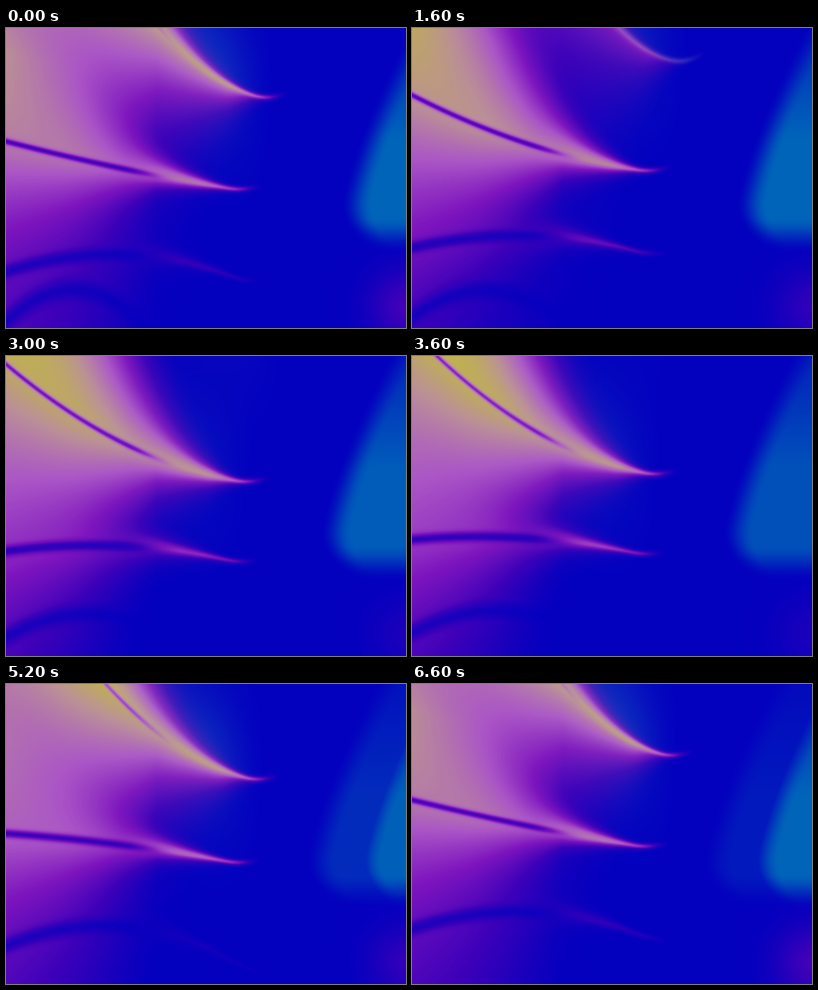
An HTML page with a canvas that plays this animation: 400 px wide and 300 px high, repeating every 6700 ms.

```html
<!DOCTYPE html>
<html lang="en">
<head>
<meta charset="utf-8">
<title>Gradient folds</title>
<style>
html, body { margin: 0; width: 100%; height: 100%; overflow: hidden; background: #0300be; }
canvas { display: block; width: 100vw; height: 100vh; }
</style>
</head>
<body>
<canvas width="400" height="300"></canvas>
<script>
const W = 400, H = 300, STEPS = 67;
const ctx = document.querySelector('canvas').getContext('2d');
const image = ctx.createImageData(W, H);

function smooth(a, b, x) {
  const f = Math.min(1, Math.max(0, (x - a) / (b - a)));
  return f * f * (3 - 2 * f);
}

const bell = x => Math.exp(-x * x);

// Blue, violet, purple, pink, tan, yellow
const stops = [[3, 0, 190], [60, 0, 185], [125, 20, 190], [170, 85, 198], [186, 142, 150], [192, 185, 60]];
const palette = Array.from({ length: 257 }, (_, i) => {
  const at = i / 256 * 5, k = Math.min(4, Math.floor(at));
  return stops[k].map((v, j) => v + (stops[k + 1][j] - v) * (at - k));
});

// A fold rises one place per loop; its crease is a parabola ending at the tip.
function makeFold(age) {
  const late = Math.max(0, age), early = Math.min(0, age), sweep = late ** 2.6;
  const y0 = 113 - 170 * age - 40 * early ** 2 - 233 * sweep;
  const y1 = 147 - 82 * age - 70 * sweep;
  const tipX = 240 + 12 * age + 15 * age ** 2;
  const tipY = 163 - 78 * age - 8 * age ** 3 - 6 * age ** 5;
  const slope = (y1 - y0) / 150;
  const bend = ((tipY - y1) / (tipX - 150) - slope) / tipX;

  const level = smooth(-1.5, .9, age) * (1 - smooth(1, 1.5, age));
  const rise = .4 + .6 * bell((age - .4) / .4);
  const fall = Math.max(.5, .6 + 1.2 * age + .9 * late ** 2);
  const cool = smooth(1, 1.35, age);
  const glow = Math.max(0, 1 - Math.abs(age - .9) / .7);
  const crease = .68 - .25 * smooth(.3, .8, age);

  function column(x) {
    const q = Math.max(.1, (tipX - x) / 100);
    return {
      y: y0 + slope * x + bend * x * (x - 150) - .006 * Math.max(0, x - tipX + 20) ** 2,
      up: 2 + 55 * rise * q ** 2.2,
      down: 2 + 24 * fall * q ** 1.6 + 50 * (1 + 1.5 * late) * Math.max(0, 1 - x / 150),
      body: level * smooth(tipX + 8, tipX - 50, x) * (1 - .25 * smooth(50, 220, x)),
      lift: .3 * Math.min(1, level * 1.6) * Math.max(0, 1 - x / 200),
      ridge: .4 * Math.min(1, level * 2 + cool) *
        smooth(tipX - 130, tipX - 60, x) * smooth(tipX + 18, tipX - 15, x),
      dark: crease * smooth(178, 120, x),
      haze: glow * smooth(tipX + 5, tipX - 65, x)
    };
  }
  return { column, cool, creaseWidth: 3.2 + 3.5 * -early };
}

function makeVeil(age) {
  return { x: 346 - 46 * age, alpha: smooth(-.8, -.15, age) * (1 - .75 * smooth(.3, 1, age)) };
}

function draw(phase) {
  const folds = [-2, -1, 0, 1].map(k => makeFold(phase + k));
  const veils = [-1, 0].map(k => makeVeil(phase + k));
  const corner = .15 + .07 * Math.cos(phase * 2 * Math.PI);

  for (let x = 0; x < W; x++) {
    const columns = folds.map(f => f.column(x));
    for (let y = 0; y < H; y++) {
      let sum = 0, shade = 1, light = 0, haze = 0;
      for (let i = 0; i < folds.length; i++) {
        const f = folds[i], c = columns[i], s = y - c.y;
        const d = Math.abs(s) / (s < 0 ? c.up : c.down);
        if (d < 4 && c.body) {
          const lift = s < 0 ? c.lift * Math.min(1, -s / 90) : 0;
          sum += ((c.body + lift) * Math.exp(-(d ** 1.2))) ** 3;
        }
        if (c.ridge) {
          const h = c.ridge * bell((s + .15 * c.up) / (.3 * c.up + 2));
          light += h * (1 - f.cool);
          haze += 3 * h * f.cool;
        }
        if (c.dark && Math.abs(s) < 3 * f.creaseWidth) shade *= 1 - c.dark * bell(s / f.creaseWidth);
        if (c.haze && Math.abs(s) < 180) haze += c.haze * (s < 0 ? 1 : .5) * bell(s / 75);
      }

      let v = Math.cbrt(sum) * shade;
      v += light * Math.max(0, 1 - v);
      if (x > 280 && y > 160) v += corner * bell(Math.hypot(x - 400, y - 278) / 36);
      v = Math.min(1, v);
      haze *= 1 - v;

      let cyan = 0;
      if (x > 270 && y < 225) {
        const lean = 55 * (Math.max(0, 175 - y) / 150) ** 1.3 + 25 * (Math.max(0, y - 175) / 45) ** 2;
        const fade = smooth(225, 188, y) * (.4 + .6 * Math.min(1, y / 110));
        for (const veil of veils) {
          const left = veil.x + lean;
          cyan = Math.max(cyan, veil.alpha * smooth(left - 12, left + 20, x) * fade);
        }
      }

      const color = palette[Math.round(v * 256)], p = (y * W + x) * 4;
      image.data[p] = color[0] * (1 - cyan) + 12 * haze;
      image.data[p + 1] = color[1] + 100 * cyan + 55 * haze;
      image.data[p + 2] = color[2] - 5 * cyan;
      image.data[p + 3] = 255;
    }
  }
  ctx.putImageData(image, 0, 0);
}

let last = -1;
function tick() {
  const step = Math.floor(performance.now() / 100) % STEPS;
  if (step !== last) draw((last = step) / STEPS);
  requestAnimationFrame(tick);
}
tick();
</script>
</body>
</html>
```
